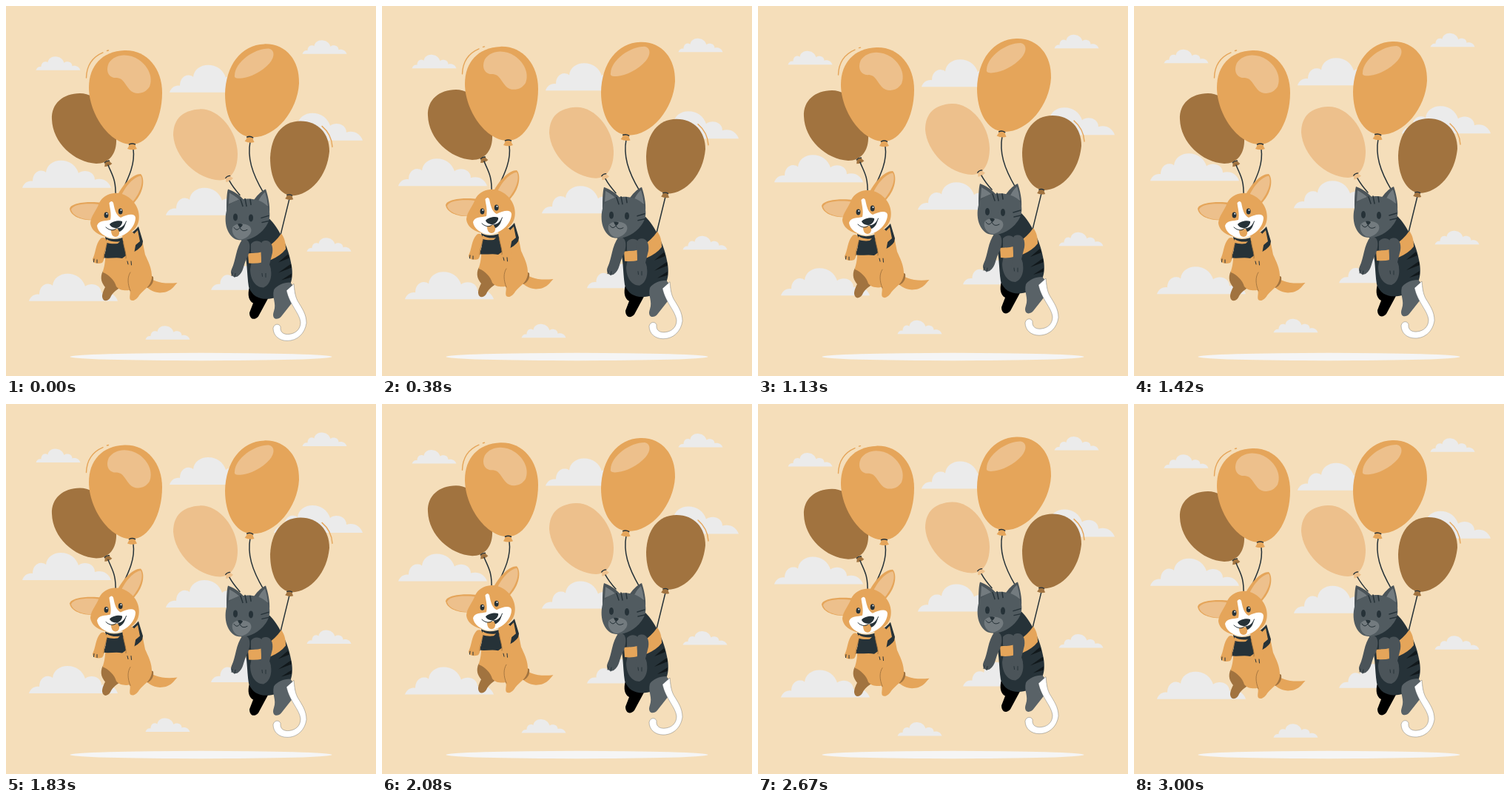
Recreate the animation shown at these times as an HTML page. Size 500 px wide and 500 px high, loop 3.04 s.

```html
<!DOCTYPE html>
<html lang="en">
<head>
<meta charset="utf-8">
<title>Balloon ride</title>
<style>
html, body { margin: 0; width: 100%; height: 100%; overflow: hidden; background: #f5deba; }
svg { display: block; width: 100%; height: 100%; }
.o { fill: #e5a55a; }
.p { fill: #edc08c; }
.b { fill: #a1733f; }
.d { fill: #263238; }
.g { fill: #4b5459; }
.l { fill: #596267; }
.m { fill: #737b7f; }
.w { fill: #fff; }
.line { fill: none; stroke: #263238; stroke-width: 1.5; stroke-linecap: round; }
.thin { fill: none; stroke: #263238; stroke-width: 1; stroke-linecap: round; }
.arc { fill: none; stroke: #e5a55a; stroke-width: 1.4; stroke-linecap: round; }
.fold { fill: none; stroke: #a1733f; stroke-width: .9; stroke-linecap: round; }
</style>
</head>
<body>
<svg viewBox="0 0 500 500">
  <defs>
    <path id="cloud" d="M-1 0C1-6 6-10 13-9C13-17 18-24 26-23Q29-23 31-21C32-31 41-37 51-37C63-37 72-30 75-20C83-26 97-22 97-11C107-14 116-9 119 0Z"/>
    <g id="knot">
      <path d="M-4-3H4Q4 1 6.500 4Q0 6.500-6.500 4Q-4 1-4-3Z"/>
      <path class="line" stroke-width="2.600" d="M-4-2Q0-4 4-2"/>
    </g>
  </defs>

  <g id="clouds" fill="#ebebeb"></g>
  <ellipse cx="263.500" cy="474" rx="177" ry="5.200" fill="#f5f5f5"/>

  <g id="dog">
    <path class="b" d="M62 153C61 132 77 118 100 118C124 118 146 146 149 179C150 200 139 213 122 213C92 211 63 185 62 153Z"/>
    <use href="#knot" class="b" transform="translate(137 212) rotate(-22) scale(.85)"/>
    <path class="line" d="M138 215C143 228 149 234 148 258M172 194C175 215 164 235 155 254"/>
    <path class="o" d="M160 60C190 59 211 84 211 117C211 154 193 187 170 187C140 187 112 146 112 110C112 81 130 61 160 60Z"/>
    <path class="p" d="M139 77C147 65 165 63 180 73C193 82 199 97 194 109C188 119 174 121 167 113C160 105 159 98 150 97C139 98 134 88 139 77Z"/>
    <use href="#knot" class="o" transform="translate(170.500 189)"/>
    <path class="arc" d="M108.500 97C109 80 117 69 131 63M136.500 60.500L138.500 60"/>

    <path class="o" d="M190 363C198 373 212 376 231.500 374C225 381 222 387 208 387.500C198 387 190 381 187 376Z"/>
    <path class="b" d="M192 362L199 366C200 373 197 378 191 381L185 375Z"/>
    <path class="b" d="M131 358C126 368 130 375 134 380C131 386 130 389 130 393C131 400 137 400 141 394C144 387 150 383 158 378Z"/>
    <path class="o" d="M134 332C135 350 131 356 131 360C139 363 147 371 149 379C153 384 160 385 167 384C169 388 166 393 168 397C172 400 177 396 180 391C186 383 195 380 197 368C198 355 191 343 188 336L184 316Z"/>
    <path class="fold" d="M168 360C164 366 164 375 168 385"/>
    <path class="d" d="M134 312C148 320 168 311 179 298L185 318L184 323C179 330 172 333 164 336L157 341C148 339 138 342 131 340C136 331 136 325 134 312Z"/>
    <path class="o" d="M136 315C142 319 149 319 154 318L151 321C145 322 140 321 136 320ZM173 308L178 303L181 318L175 323Z"/>
    <path class="o" d="M128 314C134 310 139 318 135 326C132 335 134 343 130 347C124 349 117 348 117 342C121 335 121 321 128 314Z"/>
    <path class="o" d="M160 306C169 301 177 308 176 318L173 335C177 341 176 349 170 351C163 353 160 348 162 341C163 335 159 325 158 318Q156 309 160 306Z"/>
    <path class="fold" d="M158.500 318C159 326 163 335 162 341M136 322C134 332 132 335 132 341"/>
    <path class="thin" d="M119 342L118.500 346M123 343V347M164 345L165 349M169 345L169.500 350"/>

    <path class="o" d="M86 274C88 265 115 264 129 266L126 288C108 292 88 286 86 274Z"/>
    <path class="p" d="M88 275C91 267 113 266 128 268.500L125 288C108 291 90 285 88 275Z"/>
    <path class="o" d="M150 257C158 240 172 227 182 227C188 233 187 253 170 269Z"/>
    <path class="p" d="M155 258C161 243 173 231 182 229.500C186 236 183 251 170 266Z"/>
    <path class="o" d="M114 293C115 283 122 277 126 266C130 258 137 254 146 253C157 252 168 258 174 267C182 278 181 293 175 300C169 307 160 311 150 312C134 315 115 307 114 293Z"/>
    <path class="w" d="M139.500 266Q143 262 145 266C147 276 149 283 155 286C163 282 174 279 175 286C175 297 165 310 149 313C135 315 124 306 123 297C125 289 135 291 141 289C143 281 140 272 139.500 266Z"/>
    <path class="o" d="M142 303Q148 300 153 302C154 308 152 312 148 312C144 312 142 308 142 303Z"/>
    <path class="d" d="M151 301C156 300 160 297 162 292C161 299 157 304 153 305Q152 303 151 301Z"/>
    <path class="thin" d="M135 299C140 304 147 304 149.500 300C154 302 160 298 162.500 291"/>
    <path class="d" d="M140 295C143 291 153 289 157 291C158 295 153 300 149 300C145 300 141 298 140 295Z"/>
    <ellipse class="d" cx="135.500" cy="282.500" rx="2.900" ry="4"/>
    <ellipse class="d" cx="154.700" cy="277.500" rx="2.900" ry="4"/>
    <circle class="w" cx="136.300" cy="280.800" r="1"/>
    <circle class="w" cx="155.500" cy="275.800" r="1"/>
  </g>

  <g id="cat">
    <path class="p" d="M262 140C287 139 312 168 313 200C313 222 304 236 289 236C258 235 228 205 226 175C226 152 240 141 262 140Z"/>
    <use href="#knot" class="p" transform="translate(300.500 233) rotate(-28) scale(.85)"/>
    <path class="line" d="M302 237Q307 246 316 256M330 184C326 205 332 226 348 253M383 261L371 310"/>
    <path class="o" d="M349 52C378 51 397 74 396 105C394 142 365 178 333 178C308 177 296 148 296 120C297 80 318 53 349 52Z"/>
    <path class="p" d="M309 94C310 76 335 58 355 58C364 60 363 70 356 78C346 89 330 97 319 98C312 99 308 98 309 94Z"/>
    <use href="#knot" class="o" transform="translate(329.500 180) rotate(6)"/>
    <path class="b" d="M398 156C422 156 437 173 437 197C434 230 412 256 386 257C367 255 357 232 357 206C358 176 373 156 398 156Z"/>
    <use href="#knot" class="b" transform="translate(383 258) rotate(6) scale(.85)"/>
    <path class="arc" d="M427 163Q440 174 441 191"/>

    <path d="M329 380C326 391 328 399 334 402L329 415C329 424 336 426 341 420L355 394Z"/>
    <path class="d" d="M318 316C327 340 325 362 328 380C334 397 350 399 366 394C384 388 389 370 386 352C382 325 368 300 356 288Z"/>
    <path class="g" d="M332 345C342 348 352 347 356 351C361 362 358 377 348 381C337 381 330 370 330 356Z"/>
    <path class="l" d="M362 384C359 395 366 402 362 413C358 424 367 426 372 420L387 401C393 391 390 379 384 374C375 374 366 378 362 384Z"/>
    <path class="o" d="M327 335C345 334 361 324 372 308C376 313 378 320 378 329C367 343 346 350 328 348Z"/>
    <path d="M381 336L368 347L383 341ZM385 349L368 361L386 354ZM386 362L372 371L386 367Z" fill="#11181b"/>
    <path class="g" d="M331 322C335 317 342 317 346 321L345 333Q338 335 331 334Z"/>
    <path class="g" d="M320 315C329 315 332 324 327 338C320 350 322 360 313 366C306 369 302 362 305 356C311 344 310 328 320 315Z"/>
    <path class="g" d="M346 319C355 314 362 322 360 334L356 350C360 358 357 367 350 368C342 369 341 361 344 354C347 343 342 326 346 319Z"/>
    <path class="thin" d="M306 361L305 365M310 362L309 367M346 362L346.500 366M351 362V367"/>
    <path class="w" d="M379 385L389 376C390 384 390 391 394 399C400 409 406 417 406 429C404 443 394 453 380 453C369 453 361 446 361 436C362 430 369 429 371 434C370 442 376 445 383 444C392 443 398 437 398 428C397 416 383 404 379 385Z" stroke="#263238" stroke-width=".3"/>

    <path class="g" d="M298 279C298 266 298 255 300 248C308 251 315 255 322 263ZM334 264C338 258 344 251 351 248C354 257 357 269 356 281Z"/>
    <path class="m" d="M301 268L302 253C307 256 312 259 315 262ZM341 264Q345 256 350 252Q353 261 354 271Z"/>
    <path fill="#515b60" d="M300 271C310 260 335 257 350 268C359 275 358 291 350 300C341 313 323 320 311 316C297 310 293 288 300 271Z"/>
    <path class="m" d="M306 300C309 294 322 293 329 298C335 304 329 313 319 316C311 317 304 308 306 300Z"/>
    <path d="M317 262L320 271M323 261L325 271M330 262L331 269M355 284L345 287M355 291L346 293" class="line"/>
    <ellipse class="d" cx="310" cy="286" rx="3" ry="5"/>
    <ellipse class="d" cx="331" cy="287" rx="3" ry="5"/>
    <path class="d" d="M313 295Q317 294 320 296Q318 300 316 300Q314 298 313 295Z"/>
    <path class="thin" d="M308 300Q312 306 316 300Q319 307 326 303"/>
  </g>
</svg>
<script>
const LOOP = 3040, RISE = 10;
const el = id => document.getElementById(id);

// x, base line, scale
const places = [
  [41, 87, .5], [401, 65, .5], [407, 332, .5], [189, 451, .5],
  [23, 246, 1], [32, 399, 1], [222, 117, 1], [217, 283, 1], [363, 182, 1], [278, 384, .88]
];
el("clouds").innerHTML = places.map(([x, y, s]) =>
  `<use href="#cloud" transform="translate(${x} ${y}) scale(${s})"/>`).join("");

// start: time of the lowest point; base: resting shift
const floats = [
  { node: el("clouds"), period: 3000, start: 0, base: -.3 },
  { node: el("dog"), period: 1500, start: -40, base: .5 },
  { node: el("cat"), period: 1500, start: 180, base: -.6 }
];

function lift(t, period, start) {
  if (t < start) return 0;
  const p = (t - start) / period % 1;
  return RISE * (1 - Math.abs(1 - 2 * p));
}

const origin = performance.now();
function draw(now) {
  const t = Math.max(0, now - origin) % LOOP;
  for (const { node, period, start, base } of floats) {
    node.setAttribute("transform", `translate(0 ${(base - lift(t, period, start)).toFixed(2)})`);
  }
  requestAnimationFrame(draw);
}
draw(origin);
</script>
</body>
</html>
```
